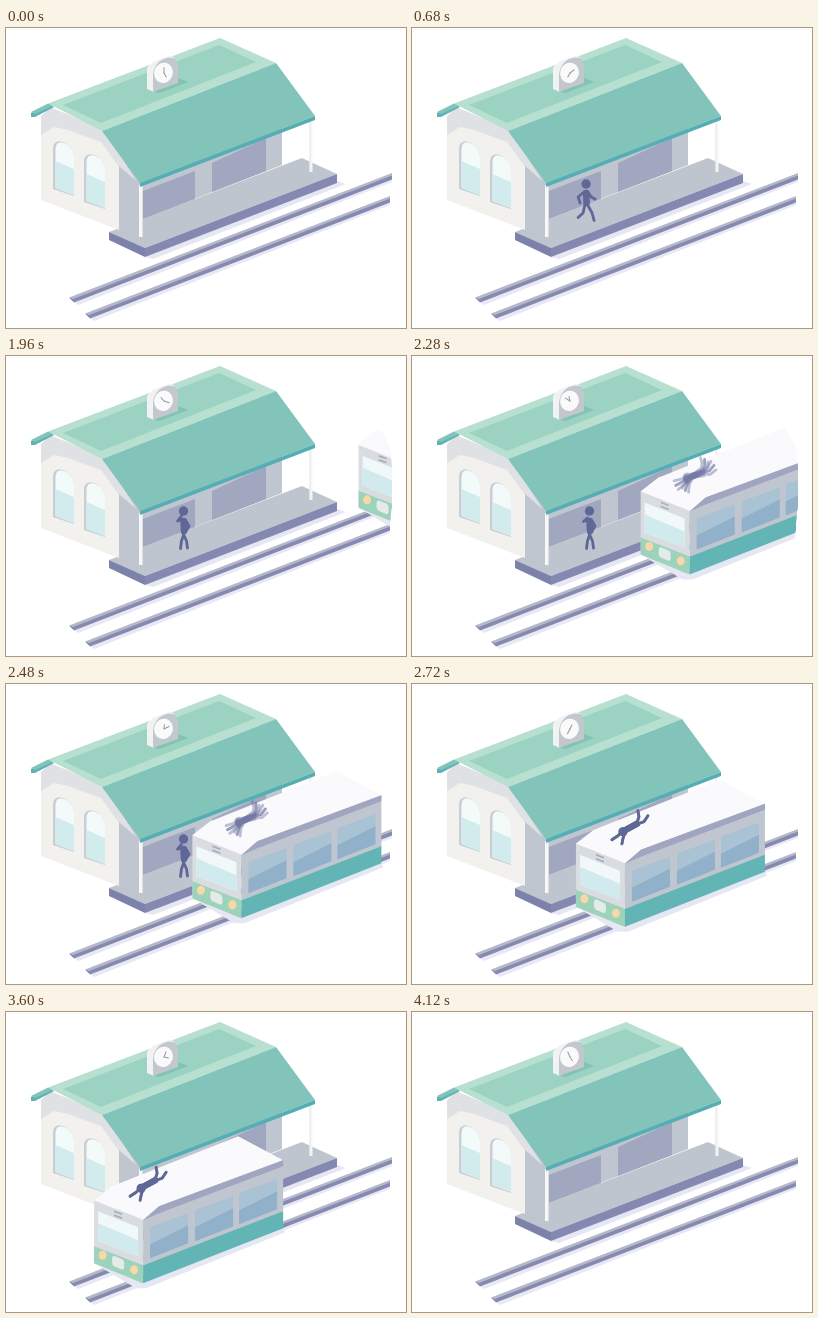
Recreate the animation shown at these times as an HTML page. Size 400 by 300 pixels, loop 4.16 s.

```html
<!DOCTYPE html>
<html lang="en">
<head>
<meta charset="utf-8">
<title>Station</title>
<style>
  html, body { margin: 0; width: 100%; height: 100%; overflow: hidden; background: #fff; }
  svg { display: block; width: 400px; height: 300px; }
  .limb { fill: none; stroke: #5f6796; stroke-width: 2.8; stroke-linecap: round; stroke-linejoin: round; }
  .torso { stroke-width: 6.5; }
  .head { fill: #5f6796; }
  .hand { stroke: #9298a8; stroke-width: 1; stroke-linecap: round; }
</style>
</head>
<body>
<svg viewBox="0 0 400 300">
  <defs>
    <clipPath id="scene"><path d="M0 0H366V66Q385 80 386 112V146L382.500 185L330 294H86L63 270Q21 234 21 190V0Z"/></clipPath>
    <clipPath id="porch"><path d="M137 100H300V230H137Z"/></clipPath>
  </defs>

  <!-- Ground shadows and rails -->
  <g>
    <path fill="#e5e7f3" d="M139 229L331 153L340 156L147 231Z"/>
    <path fill="#e8e9f4" d="M68 274L386 151V154L72 277ZM84 290L384 174V177L88 293Z"/>
    <path fill="#b4b8c9" d="M63 269.500L386 145V148L67 272ZM79 285.500L384 168V171L83 288Z"/>
    <path fill="#868ab1" d="M63 269.500L67 271L386 147.500V151.500L68 274.500ZM79 285.500L83 287L384 170.500V174.500L84 290.500Z"/>
  </g>

  <!-- Platform and walls -->
  <path fill="#bfc5ce" d="M103 204L296 130L331 146L139 220Z"/>
  <path fill="#8589b1" d="M139 220L331 146V155L139 229Z"/>
  <path fill="#7d82aa" d="M103 204L139 220V229L103 212Z"/>
  <path fill="#c0c6cf" d="M113 125L140 150L276 98V137L134 192L113 203Z"/>
  <path fill="#a1a7bf" d="M137 163L189 143V171L137 191ZM206 135L260 110V143L206 164Z"/>
  <path fill="#dfe1e5" d="M35 88L44 79L97 101L130 152L113 162V140L35 107Z"/>
  <path fill="#f2f1ee" d="M35 107L48 99L62 102L95 114L113 139V202L35 172Z"/>
  <path fill="#c0c6cf" d="M113 138L134 156V210L113 203Z"/>

  <!-- Arched windows -->
  <g id="arch">
    <path fill="#c9ced5" d="M47 161V120Q48 111 57 114Q67 118 68 129V168Z"/>
    <path fill="#f3fafa" d="M49.500 160V121Q50 112 58 115Q67 118 68 129V167Z"/>
    <path fill="#d2ecee" d="M49.500 160V133L68 141V167Z"/>
  </g>
  <use href="#arch" x="31" y="13"/>

  <g clip-path="url(#porch)"><g id="man"></g></g>

  <!-- Posts and roof -->
  <path fill="#f7f7f8" d="M133 157H136.500V209H133ZM303.500 92H306.500V144H303.500Z"/>
  <path fill="#e3e5ea" d="M303.500 92H304.500V144H303.500Z"/>
  <path fill="#5db3b3" d="M25 85L44 76L48 79L29 89H25Z"/>
  <path fill="#82c4b9" d="M25 84L42 75.500L47 78L29 86Z"/>
  <path fill="#b7e0d0" d="M42 75.500L214 10L270 35L96 103Z"/>
  <path fill="#9cd2c1" d="M57 77L213 17L250 34L95 95Z"/>
  <path fill="#83c4ba" d="M96 103L270 35L309 88L134 155Z"/>
  <path fill="#54aeb3" d="M134 155L309 88V92L134 159Z"/>

  <!-- Clock -->
  <path fill="#82c4b3" d="M148 64L172 50L182 54L154 65Z"/>
  <path fill="#f1f2f3" d="M141 61V41Q142 36 149 33L163 28L168 29L148 64Z"/>
  <path fill="#c3c8ce" d="M147 64V46Q148 36 157 31Q170 26 172 37V55Z"/>
  <ellipse cx="157.500" cy="44.800" rx="9.300" ry="10.200" fill="#fafafa" transform="rotate(18 157.500 44.800)"/>
  <path class="hand" id="hour" d="M158 45V40.500"/>
  <path class="hand" id="minute" d="M158 45V39.500"/>

  <!-- Train -->
  <g clip-path="url(#scene)">
    <g id="train">
      <path fill="#e5e7f3" d="M142 231L191 251L331 196L333 200L194 256H184Z"/>
      <path fill="#d9dce1" d="M142 168L191 188V251L142 231Z"/>
      <path fill="#9dd2bb" d="M142 214L191 233V251L142 231Z"/>
      <path fill="#f0f8f9" d="M146 179L186 195V224L146 209Z"/>
      <path fill="#d0eaed" d="M146 191L186 208V224L146 209Z"/>
      <path fill="#e9ebee" d="M142 168L160 154L207 174L191 188Z"/>
      <path fill="#fafafc" d="M142 168L160 154L286 104L331 128L207 174L191 187Z"/>
      <path fill="#c0c6d0" d="M191 188L207 174L331 128V180L191 233Z"/>
      <path fill="#a0a6c0" d="M191 188L207 174L331 128V134L207 181Z"/>
      <path fill="#62b5b4" d="M191 233L331 179V196L191 251Z"/>
      <g id="pane">
        <path fill="#a9c2d4" d="M198 197Q198 195 200 194L236 181V211L198 226Z"/>
        <path fill="#91b0c9" d="M198 212L236 193V211L198 226Z"/>
      </g>
      <use href="#pane" x="45" y="-17"/>
      <use href="#pane" x="89" y="-34"/>
      <path fill="none" stroke="#a6abb9" stroke-width="1.500" d="M162 179L170 182M162 183L170 186"/>
      <ellipse cx="150.500" cy="223" rx="4" ry="4.500" fill="#f7d8a6"/>
      <ellipse cx="182" cy="237.500" rx="4" ry="4.500" fill="#f7d8a6"/>
      <path fill="#e4ebe9" d="M160 226Q160 223 163 224L170 227Q172 228 172 231V235Q172 238 169 237L162 234Q160 233 160 230Z"/>
      <g id="rider"></g>
    </g>
  </g>
</svg>

<script>
const LOOP = 4160;
const el = id => document.getElementById(id);
const clamp = (v, a = 0, b = 1) => Math.min(b, Math.max(a, v));
const ramp = (t, a, b) => { const k = clamp((t - a) / (b - a)); return k * k * (3 - 2 * k); };
const mix = (a, b, k) => a.map((v, i) => v + (b[i] - v) * k);

// Poses: head, elbow, hand, elbow, hand, knee, foot, knee, foot
const STRIDE = [0, -38, -8, -25, -6, -19, 5, -25, 9, -23, 6, -9, 8, -1.5, -3, -9, -8, -4.5];
const PASS   = [0, -39, -5, -25, -4, -18, 5, -25, 5, -18, 3, -10, 1, -1, 0, -10, -3, -4];
const REST   = [0, -39, -6, -25, -3, -18, 5.5, -24, 2, -18, -2, -9, -3, -1.5, 3, -9, 4, -2];
const THINK  = [0, -39, -6, -29, -2, -34, 5.5, -24, 2, -18, -2, -9, -3, -1.5, 3, -9, 4, -2];

function figure(p) {
  const line = (x, y, i) => `M${x} ${y}L${p[i]} ${p[i + 1]}L${p[i + 2]} ${p[i + 3]}`;
  return `<path class="limb torso" d="M0 -29L0.500 -19"/>
    <path class="limb" d="${line(-2, -30, 2)}${line(2, -30, 6)}${line(1, -18, 10)}${line(-1, -18, 14)}"/>
    <circle class="head" cx="${p[0]}" cy="${p[1]}" r="4.700"/>`;
}

el('rider').innerHTML = `<g><path class="limb torso" d="M-4 1L7 -5"/>
  <path class="limb" d="M-6 1L-12 7L-18 11M-5 3L-7 10L-8 15M7 -6L9 -12L8 -18M8 -5L14 -7L18 -13"/>
  <circle class="head" cx="-7" cy="3" r="4.500"/></g>`.repeat(3);
const riders = [...el('rider').children];

// Train path: time, offset, speed
const TRACK = [
  [1720, 300, -0.3], [1960, 211, -0.42], [2280, 87, -0.3],
  [2720, 22, -0.07], [3360, 0, 0], [3920, -300, -1.1]
];

function trainX(t) {
  if (t <= TRACK[0][0]) return 320;
  for (let i = 1; i < TRACK.length; i++) {
    const [a, p, u] = TRACK[i - 1], [b, q, v] = TRACK[i];
    if (t > b) continue;
    const d = b - a, k = (t - a) / d, k2 = k * k, k3 = k2 * k;
    return (2 * k3 - 3 * k2 + 1) * p + (k3 - 2 * k2 + k) * d * u
         + (3 * k2 - 2 * k3) * q + (k3 - k2) * d * v;
  }
  return -340;
}

function drawMan(t) {
  const shown = t > 40 && t < 2720;
  el('man').style.display = shown ? '' : 'none';
  if (!shown) return;
  const x = Math.min(177.500, 174 + 0.092 * (t - 680));
  const y = 191 + 3 * ramp(t, 200, 680);
  const step = 0.5 - 0.5 * Math.cos(2 * Math.PI * (t - 680) / 320);
  const idle = mix(REST, THINK, ramp(t, 1160, 1400) * (0.94 + 0.06 * Math.cos((t - 1960) / 100)));
  el('man').innerHTML = figure(mix(mix(STRIDE, PASS, step), idle, ramp(t, 690, 860)));
  el('man').setAttribute('transform', `translate(${x} ${y})`);
}

function drawRider(t) {
  const phase = Math.PI * (t - 2720) / 176;
  const blur = Math.abs(Math.sin(phase));
  const turn = 6 * Math.sin(phase) ** 2;
  riders.forEach((r, i) => {
    const side = i - 1;
    r.setAttribute('transform', `translate(196 153) rotate(${turn + side * 13 * blur})`);
    r.setAttribute('opacity', side ? 0.4 : 1 - 0.4 * blur);
  });
}

function draw(t) {
  el('hour').setAttribute('transform', `rotate(${150 + 360 * t / LOOP} 158 45)`);
  el('minute').setAttribute('transform', `rotate(${7 * 360 * t / LOOP} 158 45)`);
  drawMan(t);
  const x = trainX(t);
  el('train').setAttribute('transform', `translate(${x} ${-0.376 * x})`);
  drawRider(t);
}

const start = performance.now();
function frame() {
  draw((performance.now() - start) % LOOP);
  requestAnimationFrame(frame);
}
draw(0);
requestAnimationFrame(frame);
</script>
</body>
</html>
```
